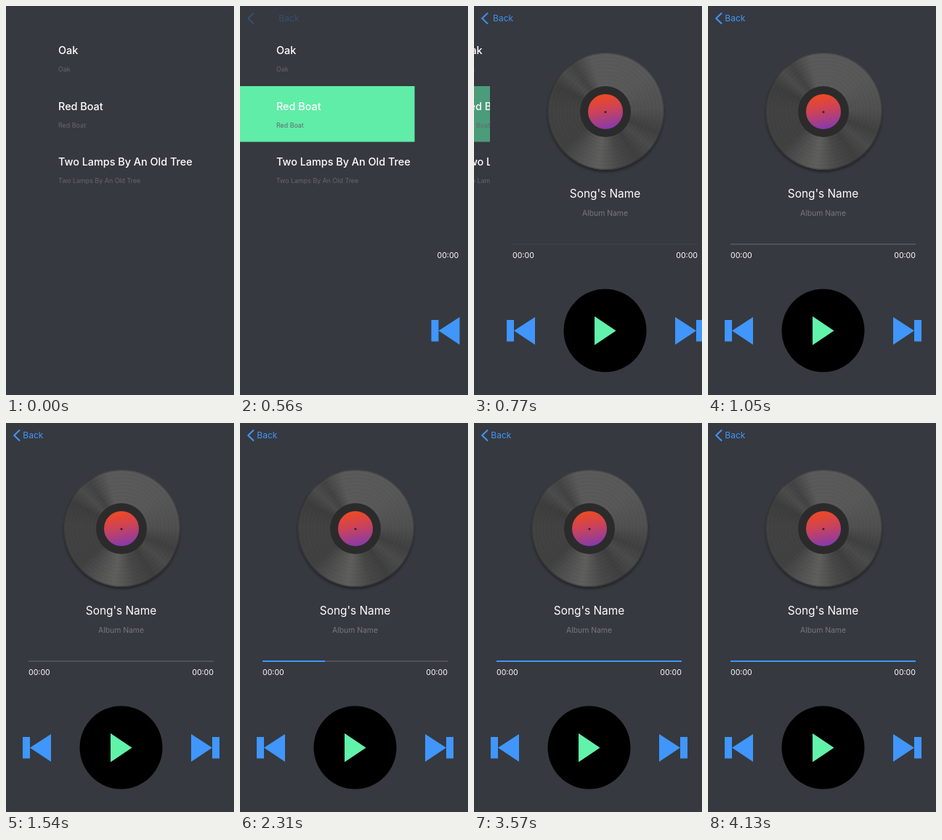
An HTML page that plays this animation: 314x534 px, repeating every 4200 ms.

```html
<!DOCTYPE html>
<html lang="en">
<head>
<meta charset="utf-8">
<title>Music player</title>
<style>
  html, body { margin: 0; width: 100%; height: 100%; overflow: hidden; background: #36393f; }
  #stage { position: relative; width: 314px; height: 534px; overflow: hidden; }
  .pane, .pane svg, #nav { position: absolute; left: 0; top: 0; width: 314px; height: 534px; }
  .pane { background: #36393f; }
  text { font-family: Inter, Roboto, sans-serif; fill: #fff; }
  .title { font-size: 14.4px; font-weight: 500; }
  .sub { font-size: 8.9px; fill: #66686d; }
  .song { font-size: 15.4px; }
  .album { font-size: 10.4px; fill: #76787d; }
  .time { font-size: 10.6px; }
  .blue { fill: #4096fb; }
  .back { font-size: 12px; }
  .disc {
    position: absolute; left: 78.5px; top: 64px; width: 161px; height: 161px; border-radius: 50%;
    background:
      repeating-radial-gradient(circle, transparent 0 3px, rgba(0, 0, 0, .04) 4px 5px),
      conic-gradient(#5a5a5a, #585858 50deg, #505050 88deg, #404040 112deg, #4b4b4b 128deg,
        #3f3f3f 146deg, #484848 165deg, #5f5f5d 188deg, #515151 208deg, #414141 228deg,
        #424242 275deg, #3d3d3d 298deg, #4c4c4c 313deg, #434343 325deg, #5a5a5a 345deg);
    box-shadow: inset 0 0 1px 1px rgba(25, 25, 25, .4), 0 3px 3px rgba(0, 0, 0, .35);
  }
</style>
</head>
<body>
<div id="stage">
  <div class="pane" id="list">
    <svg>
      <rect id="highlight" y="110" width="314" height="76.5" fill="#5feda8"/>
      <g id="songs"></g>
    </svg>
  </div>

  <div class="pane" id="player">
    <div class="disc"></div>
    <svg>
      <defs>
        <linearGradient id="label" x1=".4" y1="0" x2=".6" y2="1">
          <stop offset="0" stop-color="#f04a20"/>
          <stop offset=".45" stop-color="#cc4358"/>
          <stop offset="1" stop-color="#843aae"/>
        </linearGradient>
      </defs>
      <circle cx="159" cy="145" r="35" fill="#2b2b2c"/>
      <circle cx="159" cy="145" r="24" fill="url(#label)"/>
      <circle cx="159" cy="145.5" r="1.5" fill="#3a2030"/>

      <g text-anchor="middle">
        <text class="song" x="158.5" y="262.5">Song's Name</text>
        <text class="album" x="158.5" y="288">Album Name</text>
      </g>

      <rect id="track" x="31" y="326" width="255" height="2" fill="#505258"/>
      <rect id="progress" class="blue" x="31" y="326" height="2"/>
      <text class="time" x="31" y="346">00:00</text>
      <text class="time" x="286" y="346" text-anchor="end">00:00</text>

      <path class="blue" d="M23 431h10v29.5h-10zM33 445.7L62 427V465z"/>
      <path class="blue" d="M294 431h-10v29.5h10zM284 445.7L255 427V465z"/>
      <circle cx="158.5" cy="445.5" r="57"/>
      <path d="M144 426L173.5 445.7L144 465.5z" fill="#62f3ab"/>
    </svg>
  </div>

  <svg id="nav">
    <path d="M19 9.5L11.2 17L19 24.5" fill="none" stroke="#4096fb" stroke-width="2"/>
    <text id="back" class="blue back" y="21.4">Back</text>
  </svg>
</div>

<script>
  const LOOP = 4200, STEP = 70, WIDTH = 314;
  const TAP = 420, PUSH = 503.5, SETTLED = 1050;
  const byId = id => document.getElementById(id);
  const clamp = v => Math.min(1, Math.max(0, v));

  byId('songs').innerHTML = ['Oak', 'Red Boat', 'Two Lamps By An Old Tree'].map((name, i) => {
    const y = 66 + i * 76.5;
    return `<text class="title" x="72" y="${y}">${name}</text>
            <text class="sub" x="72" y="${y + 24.2}">${name}</text>`;
  }).join('');

  // Critically damped spring for the screen push
  function pushAmount(t) {
    if (t >= SETTLED) return 1;
    const x = Math.max(0, t - PUSH) * 0.01625;
    return 1 - (1 + x) * Math.exp(-x);
  }

  function easeInOut(v) {
    const x = clamp(v);
    return x * x * (3 - 2 * x);
  }

  function render(t) {
    const pushed = pushAmount(t);
    const offset = WIDTH * (1 - pushed);
    byId('player').style.transform = `translateX(${offset}px)`;
    byId('list').style.transform = `translateX(${-0.3 * WIDTH * pushed}px)`;
    byId('highlight').style.opacity = t < TAP ? 0 : 1 - clamp((t - 600) / 380);
    byId('nav').style.opacity = pushed;
    byId('back').setAttribute('x', 23.3 + offset * 0.125);
    byId('track').style.opacity = clamp((t - 700) / 300);
    byId('progress').setAttribute('width', 255 * easeInOut((t - 1530) / 2000));
  }

  function tick() {
    const t = performance.now() % LOOP;
    render(Math.floor(t / STEP) * STEP);
    requestAnimationFrame(tick);
  }
  tick();
</script>
</body>
</html>
```
